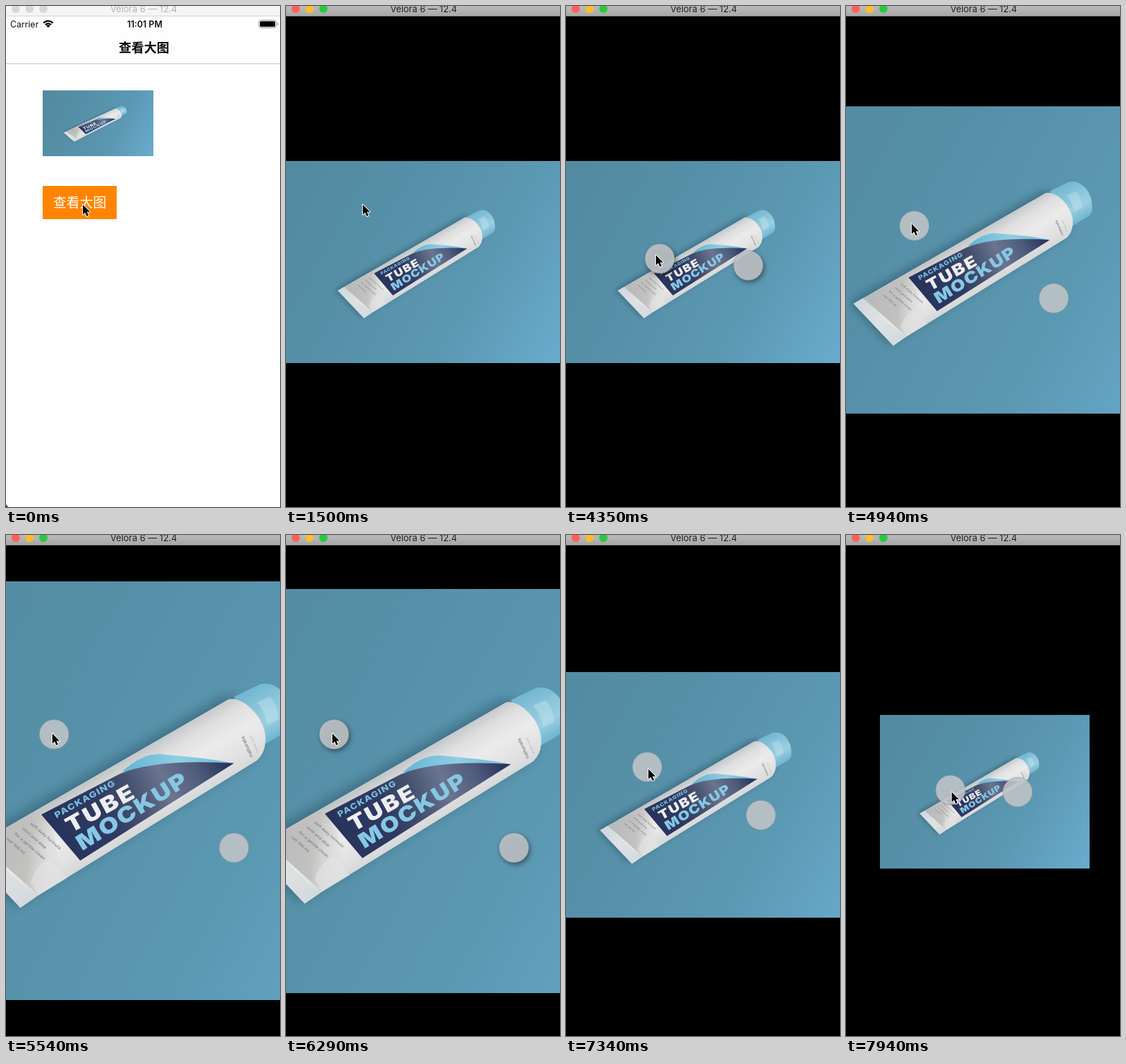
These frames come from a looping animation (396x724 px, 8000 ms). An HTML page with a canvas:

```html
<!DOCTYPE html>
<html lang="zh">
<head>
<meta charset="utf-8">
<title>查看大图</title>
<style>
html, body { margin: 0; width: 396px; height: 724px; overflow: hidden; background: #000; }
canvas { display: block; width: 396px; height: 724px; }
</style>
</head>
<body>
<canvas id="stage"></canvas>
<script>
const W = 396, H = 724, LOOP = 8000;
const canvas = document.getElementById('stage');
const ctx = canvas.getContext('2d');
const dpr = window.devicePixelRatio || 1;
canvas.width = W * dpr;
canvas.height = H * dpr;

const SANS = 'Inter, Roboto, sans-serif';
const CJK = '"Noto Sans CJK SC", "Noto Sans CJK", "Noto Sans CJK JP", sans-serif';

// Photo size on screen at zoom 1; the tube is drawn at DETAIL times that
const PHOTO = { w: 399, h: 292 };
const DETAIL = 1.51;

// Finger poses relative to the pivot they mirror around
const PIVOT = { x: 199.5, y: 370 };
const REST = [-58.5, -3.5], CLOSE = [-64, -5], WIDE = [-130, -82], TIGHT = [-48.5, -1.5];

// When things happen, in ms
const OPEN = 1500, TOUCH = 3600, SPREAD = 4340, SPREAD_END = 5540,
  RELEASE = 5840, RETOUCH = 6290, PINCH = 6590, PINCH_END = 7940, STEP = 150;

const lerp = (a, b, p) => a + (b - a) * p;
const clamp = v => Math.min(1, Math.max(0, v));
const ease = u => (1 - Math.cos(Math.PI * u)) / 2;
const bump = p => Math.sin(Math.PI * p);

function path(d, fill) {
  ctx.fillStyle = fill;
  ctx.fill(new Path2D(d));
}

function disc(x, y, r, fill) {
  ctx.beginPath();
  ctx.arc(x, y, r, 0, Math.PI * 2);
  ctx.fillStyle = fill;
  ctx.fill();
}

function blend(x0, y0, x1, y1, ...colors) {
  const g = ctx.createLinearGradient(x0, y0, x1, y1);
  colors.forEach((c, i) => g.addColorStop(i / (colors.length - 1), c));
  return g;
}

function label(text, x, y, font, fill, align = 'left') {
  ctx.font = font;
  ctx.fillStyle = fill;
  ctx.textAlign = align;
  ctx.fillText(text, x, y);
}

// Text printed on the tube, foreshortened by its tilt
function print(text, x, y, deg, font, fill, gap = 0) {
  ctx.save();
  ctx.translate(x, y);
  ctx.rotate(deg * Math.PI / 180);
  ctx.scale(1, .84);
  ctx.letterSpacing = gap + 'px';
  label(text, 0, 0, font, fill);
  ctx.restore();
}

function tube(k) {
  const cap = 'M294 268 L321 255 C338 250 355 268 355 291 Q355 300 350 304 L325 319 Z';
  const body = 'M12 430 L288 271 C303 266 330 292 327 316 Q326 328 318 335 L88 477 L69 490 Z';

  ctx.save();
  ctx.shadowColor = 'rgba(25,62,82,.5)';
  ctx.shadowBlur = 15 * k;
  ctx.shadowOffsetX = -5 * k;
  ctx.shadowOffsetY = -2 * k;
  path(body, '#d8dadb');
  ctx.restore();

  path(cap, blend(310, 258, 340, 310, '#70b5d0', '#86c3d9', '#9ccfe0', '#70b5d1'));
  path('M318 274 L332 268 Q341 279 341 292 L329 298 Q327 283 318 274 Z', 'rgba(200,230,240,.4)');
  path(body, blend(153, 347, 194, 414, '#bfc3c5', '#e0e0e0', '#ebebeb', '#e3e3e3', '#d5d6d7'));

  // Pressed end of the tube
  path('M26 422 L88 387 L104 412 L112 450 L88 477 Z',
    blend(40, 420, 118, 430, '#b9bbba', '#c2c2c0', 'rgba(222,222,222,0)'));
  path('M88 477 L80 464 Q84 446 100 438 L118 459 Z', 'rgba(228,228,228,.6)');
  path('M12 430 L25 422 L85 479 L69 490 Z', blend(16, 427, 77, 485, '#ccd9dd', '#dee2e3', '#d3dade'));

  // Printed label
  path('M176 347 Q200 325 222 329 Q262 332 294 338 L215 345 Z',
    blend(180, 340, 294, 338, '#67b5d4', '#90cfe3', '#69b6d3'));
  path('M91 392 L174 349 Q213 333 294 338 L132 440.5 Z',
    blend(95, 420, 285, 330, '#27325a', '#2b365f', '#2f3a63', '#46516f', '#6b7590', '#505c7c', '#27325b'));
  print('PACKAGING', 107, 396, -29.3, '800 10.5px ' + SANS, '#7ac1dc', 1);
  print('TUBE', 122, 412, -29, '900 27px ' + SANS, '#eceef0', 2);
  print('MOCKUP', 134, 430.5, -32, '900 27px ' + SANS, '#86c8e3', 1.6);

  ['soft daily formula', 'mint and aloe', 'for a gentle clean', 'net 100 ml'].forEach((line, i) =>
    print(line, 79 - i * 8.3, 402 + i * 5.4, 41, '500 5px ' + SANS, '#7c7f82'));
  print('naturals', 314, 331, -114, '700 6px ' + SANS, '#8b8e92');
  print('fresh care', 320, 326, -114, '400 4px ' + SANS, '#b0b2b4');
}

function photo(cx, cy, sx, sy) {
  const w = PHOTO.w * sx, h = PHOTO.h * sy;
  const left = Math.round(cx - w / 2), top = Math.round(cy - h / 2);
  const right = Math.round(cx + w / 2), bottom = Math.round(cy + h / 2);
  ctx.save();
  ctx.beginPath();
  ctx.rect(left, top, right - left, bottom - top);
  ctx.clip();
  ctx.fillStyle = blend(cx - w / 2, cy - h * .3, cx + w / 2, cy + h * .45,
    '#528ba1', '#5690a8', '#5b98b2', '#69abcd');
  ctx.fillRect(left, top, right - left, bottom - top);
  ctx.translate(cx, cy);
  ctx.scale(sx / DETAIL, sy / DETAIL);
  ctx.translate(-198.5, -367);
  tube(sy / DETAIL * dpr);
  ctx.restore();
}

function titleBar(active) {
  ctx.fillStyle = active ? blend(0, 0, 0, 14, '#b9b9b9', '#a8a8a8') : '#f5f5f5';
  ctx.fillRect(0, 0, W, 14);
  ctx.fillStyle = active ? '#8b8b8b' : '#d2d2d2';
  ctx.fillRect(0, 14, W, 1);
  const lights = active ? ['#ff5f57', '#ffbd2e', '#28c940'] : Array(3).fill('#d8d8d8');
  lights.forEach((c, i) => disc(14 + i * 20, 4, 6, c));
  label('Velora 6 — 12.4', 199, 9, '400 13px ' + SANS, active ? '#222' : '#b2b2b2', 'center');
}

function statusBar() {
  label('Carrier', 6, 30.5, '400 12.6px ' + SANS, '#111');
  label('11:01 PM', 200.5, 30.5, '600 12.6px ' + SANS, '#111', 'center');

  ctx.strokeStyle = '#000';
  ctx.lineWidth = 2.3;
  [5.6, 9.4].forEach(r => {
    ctx.beginPath();
    ctx.arc(61, 31, r, -Math.PI * .76, -Math.PI * .24);
    ctx.stroke();
  });
  path('M61 31.3 L58.2 28.4 Q61 26.2 63.8 28.4 Z', '#000');

  ctx.lineWidth = 1;
  ctx.strokeStyle = '#8c8c8c';
  ctx.beginPath();
  ctx.roundRect(365.5, 20.5, 25, 11, 3);
  ctx.stroke();
  ctx.beginPath();
  ctx.roundRect(367, 22, 22, 8, 1.5);
  ctx.fillStyle = '#000';
  ctx.fill();
  path('M392 24 Q395 26 392 28 Z', '#8c8c8c');
}

function listScreen() {
  ctx.fillStyle = '#fefefe';
  ctx.fillRect(0, 0, W, H);
  statusBar();
  label('查看大图', 199.5, 66.5, '700 18.2px ' + CJK, '#0a0a0a', 'center');
  ctx.fillStyle = '#c4c4c4';
  ctx.fillRect(0, 83, W, 1);
  photo(133, 169.3, 160 / PHOTO.w, 95.5 / PHOTO.h);
  ctx.fillStyle = '#ff8500';
  ctx.fillRect(53, 260, 107, 48);
  label('查看大图', 106.5, 291, '400 19.3px ' + CJK, '#fff', 'center');
  path('M0 720 Q1 723 4 724 L0 724 Z', '#222');
  titleBar(false);
}

function cursor(x, y) {
  ctx.save();
  ctx.translate(x, y);
  const arrow = new Path2D('M0 0 V14.6 L3.4 11.5 L5.8 16.8 L8.2 15.8 L5.9 10.6 H10.4 Z');
  ctx.lineWidth = 2;
  ctx.lineJoin = 'round';
  ctx.strokeStyle = '#fff';
  ctx.stroke(arrow);
  ctx.fillStyle = '#000';
  ctx.fill(arrow);
  ctx.restore();
}

function finger(x, y, raised) {
  ctx.save();
  if (raised) {
    ctx.shadowColor = 'rgba(0,0,0,.5)';
    ctx.shadowBlur = 7 * dpr;
    ctx.shadowOffsetX = 2 * dpr;
    ctx.shadowOffsetY = 3 * dpr;
  }
  disc(x, y, 21.3, 'rgba(190,196,199,.9)');
  ctx.restore();
  ctx.lineWidth = 1;
  ctx.strokeStyle = 'rgba(135,147,153,.6)';
  ctx.stroke();
}

// Finger offset, photo centre and zoom during the two gestures
function gesture(t) {
  const now = SPREAD + Math.floor((t - SPREAD) / STEP) * STEP;
  const out = ease(clamp((now - SPREAD) / (SPREAD_END - SPREAD)) ** .9);
  const back = ease(clamp((now - PINCH) / (PINCH_END - PINCH)));
  const [from, to, p] = t < SPREAD ? [REST, REST, 0] : t < PINCH ? [CLOSE, WIDE, out] : [WIDE, TIGHT, back];
  const dx = lerp(from[0], to[0], p);
  const dy = lerp(from[1], to[1], p) - (t < PINCH ? 4.6 * bump(p) : 0);
  const gap = 2 * Math.hypot(dx, dy);

  let zoom = Math.max(1, 1 + (gap - 152) * .0069);
  if (t >= RELEASE) zoom = Math.min(2, gap / 146.7);
  if (zoom < 1) zoom = 1 - (1 - zoom) * .71;

  return {
    dx, dy, zoom, out, back,
    cx: 198.5 + 2 * back,
    cy: 369.6 - 2.6 * bump(out) + 1.2 * back + 5.8 * bump(back)
  };
}

function pointer(t, g) {
  if (t < TOUCH) {
    const p = clamp(Math.floor((t - 2100) / STEP) / 2);
    return [lerp(111, 137, p), lerp(287, 371, p)];
  }
  const slip = clamp(g.back * 8);
  return [
    PIVOT.x + g.dx - 5.5 + 3 * g.out + 4.3 * slip,
    PIVOT.y + g.dy - 5 + 4 * g.out + 4 * slip
  ];
}

function viewer(t) {
  const g = gesture(t);
  ctx.fillStyle = '#000';
  ctx.fillRect(0, 0, W, H);
  photo(g.cx, g.cy, g.zoom, g.zoom);
  titleBar(true);

  const touching = t >= TOUCH && t < RELEASE || t >= RETOUCH;
  const raised = t < SPREAD + STEP || t >= RETOUCH && t < PINCH;
  if (touching) {
    [1, -1].forEach(s => finger(PIVOT.x + s * g.dx, PIVOT.y + s * g.dy, raised));
  }
  cursor(...pointer(t, g));
}

function draw(t) {
  ctx.setTransform(dpr, 0, 0, dpr, 0, 0);
  if (t < OPEN) {
    listScreen();
    cursor(111, 287);
  } else {
    viewer(t);
  }
}

const begin = performance.now();
function tick() {
  draw((performance.now() - begin) % LOOP);
  requestAnimationFrame(tick);
}
tick();
</script>
</body>
</html>
```
